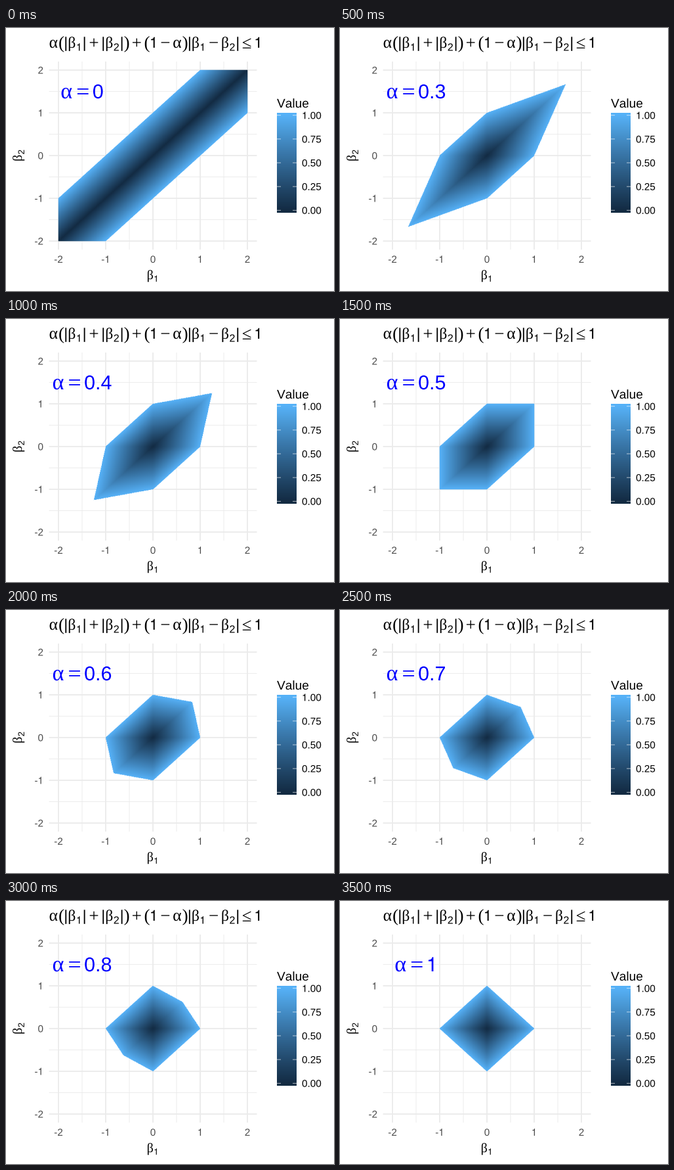
Animation, 500 px wide and 400 px high, one loop 4000 ms. Source, as a matplotlib script:

```python
import numpy as np
import matplotlib.pyplot as plt
from matplotlib.animation import ArtistAnimation
from matplotlib.colors import to_rgb
from matplotlib.patches import PathPatch
from matplotlib.path import Path
from matplotlib.textpath import TextPath
from matplotlib.transforms import Affine2D

W, H, DPI = 500, 400, 100
ALPHAS = [0, 0.3, 0.4, 0.5, 0.6, 0.7, 0.8, 1]
X0, Y0, UX, UY = 224, 194, 72, 65          # origin and pixels per unit
STEP = 0.01                                # spacing of the sampled values
SMALL, BASE, TITLE, LABEL = 15.3, 19.1, 22.9, 30.5

# Advance widths in em; digits and lowercase default to 0.556.
ADVANCE = {"α": 0.631, "β": 0.549, "+": 0.66, "−": 0.66, "=": 0.66,
           "≤": 0.66, "(": 0.36, ")": 0.36, "|": 0.26, ".": 0.278,
           "-": 0.333, "V": 0.667, "l": 0.222}
OP_SPACE = {"+": 0.165, "−": 0.165, "=": 0.15, "≤": 0.15}
GREEK_SIZE = {"α": 1.12, "β": 1.04}
MATH_SIZE, MATH_AXIS = 1.18, 0.25          # operators grow about the math axis

# A plain "1" without a foot.
ONE = Path([(0.259, 0), (0.347, 0), (0.347, 0.709), (0.289, 0.709),
            (0.262, 0.640), (0.215, 0.592), (0.102, 0.567), (0.102, 0.505),
            (0.259, 0.505), (0.259, 0)], closed=True)

fig = plt.figure(figsize=(W / DPI, H / DPI), dpi=DPI, facecolor="white")
ax = fig.add_axes([0, 0, 1, 1])
ax.axis("off")


def glyph(char):
    if char == "1":
        return ONE
    math = char in "+−=≤()"
    serif = math or char in GREEK_SIZE
    size = MATH_SIZE if math else GREEK_SIZE.get(char, 1)
    y = MATH_AXIS * (1 - size) if math else 0
    return TextPath((0, y), char, size=size,
                    prop={"family": "Liberation Serif" if serif else "Liberation Sans"})


def write(text, x, y, size, color="black", anchor=0.0, up=False):
    """Set a line of text on baseline y; "_" makes the next char a subscript."""
    parts, pen, sub = [], 0.0, False
    for char in text:
        if char == "_":
            sub = True
            continue
        scale, drop = (0.7, 0.2) if sub else (1, 0)
        gap = OP_SPACE.get(char, 0)
        pen += gap
        place = Affine2D().scale(scale).translate(pen, -drop)
        parts.append(glyph(char).transformed(place))
        pen += ADVANCE.get(char, 0.556) * scale + gap + (0.04 if sub else 0)
        sub = False
    move = Affine2D().translate(-anchor * pen, 0).scale(size, -size)
    if up:
        move.rotate_deg(-90)
    path = Path.make_compound_path(*parts).transformed(move.translate(x, y))
    return ax.add_patch(PathPatch(path, fc=color, ec="none", lw=0, zorder=5))


# Colour scale: two blues blended in CIE Lab.
RGB_XYZ = np.array([[0.4124, 0.3576, 0.1805],
                    [0.2126, 0.7152, 0.0722],
                    [0.0193, 0.1192, 0.9505]])
WHITE = RGB_XYZ.sum(axis=1)


def to_lab(color):
    c = np.array(to_rgb(color))
    lin = np.where(c > 0.04045, ((c + 0.055) / 1.055) ** 2.4, c / 12.92)
    t = RGB_XYZ @ lin / WHITE
    x, y, z = np.where(t > 0.008856, np.cbrt(t), 7.787 * t + 16 / 116)
    return np.array([116 * y - 16, 500 * (x - y), 200 * (y - z)])


def from_lab(lab):
    y = (lab[..., 0] + 16) / 116
    f = np.stack([y + lab[..., 1] / 500, y, y - lab[..., 2] / 200], axis=-1)
    xyz = np.where(f > 0.2069, f ** 3, (f - 16 / 116) / 7.787) * WHITE
    lin = np.clip(xyz @ np.linalg.inv(RGB_XYZ).T, 0, 1)
    return np.where(lin > 0.0031308, 1.055 * lin ** (1 / 2.4) - 0.055, 12.92 * lin)


LOW, HIGH = to_lab("#132B43"), to_lab("#56B1F7")


def shade(v):
    v = np.clip(v, 0, 1)[..., None]
    return from_lab(LOW + (HIGH - LOW) * v)


def tile_centers(half, unit, k):
    """Grid values under k samples per pixel, from -half to +half pixels."""
    px = (np.arange(2 * half * k) + 0.5) / k - half
    return np.round(px / unit / STEP) * STEP


def penalty(a, x, y):
    return a * (abs(x) + abs(y)) + (1 - a) * abs(x - y)


def region(a):
    hx, hy, k = 2 * UX + 1, 2 * UY + 1, 4
    x = tile_centers(hx, UX, k)
    y = -tile_centers(hy, UY, k)[:, None]
    inside = (penalty(a, x, y) < 1 + 1e-9) & (np.maximum(abs(x), abs(y)) < 2 + 1e-9)
    cover = inside.reshape(2 * hy, k, 2 * hx, k).mean(axis=(1, 3))
    value = penalty(a, tile_centers(hx, UX, 1), -tile_centers(hy, UY, 1)[:, None])
    return ax.imshow(np.dstack([shade(value), cover]),
                     extent=(X0 - hx, X0 + hx, Y0 + hy, Y0 - hy),
                     interpolation="nearest", aspect="auto", zorder=3)


def line(xs, ys, width, color, z=1):
    ax.plot(xs, ys, color=color, lw=width * 72 / DPI, solid_capstyle="butt",
            snap=False, zorder=z)


def draw_grid():
    xs = [X0 - 2.2 * UX, X0 + 2.2 * UX]
    ys = [Y0 - 2.2 * UY, Y0 + 2.2 * UY]
    for ticks, width in (([-1.5, -0.5, 0.5, 1.5], 0.93), (range(-2, 3), 1.85)):
        for t in ticks:
            line([X0 + t * UX] * 2, ys, width, "#EBEBEB")
            line(xs, [Y0 - t * UY] * 2, width, "#EBEBEB")
    for t in range(-2, 3):
        write(str(t), X0 + t * UX, 357, SMALL, "#4D4D4D", anchor=0.5)
        write(str(t), 57, Y0 - t * UY + 5.5, SMALL, "#4D4D4D", anchor=1)


def draw_legend():
    left, right, top, bottom = 413, 443, 129, 281
    first, last = 277.2, 132.8
    rows = np.arange(top, bottom) + 0.5
    bar = shade((first - rows) / (first - last))[:, None, :]
    ax.imshow(bar, extent=(left, right, bottom, top), interpolation="nearest",
              aspect="auto", zorder=3)
    write("Value", left, 121, BASE)
    for v in np.linspace(0, 1, 5):
        y = first + (last - first) * v
        line([left, left + 6], [y, y], 0.65, "white", z=4)
        line([right - 6, right], [y, y], 0.65, "white", z=4)
        write(f"{v:.2f}", 451, y + 5.5, SMALL)


draw_grid()
draw_legend()
write("α(|β_1|+|β_2|)+(1−α)|β_1−β_2|≤1", 65.6, 30, TITLE)
write("β_1", X0, 382, BASE, anchor=0.5)
write("β_2", 24, Y0 - 0.5, BASE, anchor=0.5, up=True)

scenes = [[region(a), write(f"α={a:g}", X0 - 1.5 * UX, 107, LABEL, "blue", anchor=0.5)]
          for a in ALPHAS]

ax.set_xlim(0, W)
ax.set_ylim(H, 0)

anim = ArtistAnimation(fig, scenes, interval=500, repeat=True, repeat_delay=0)
plt.show()
```
